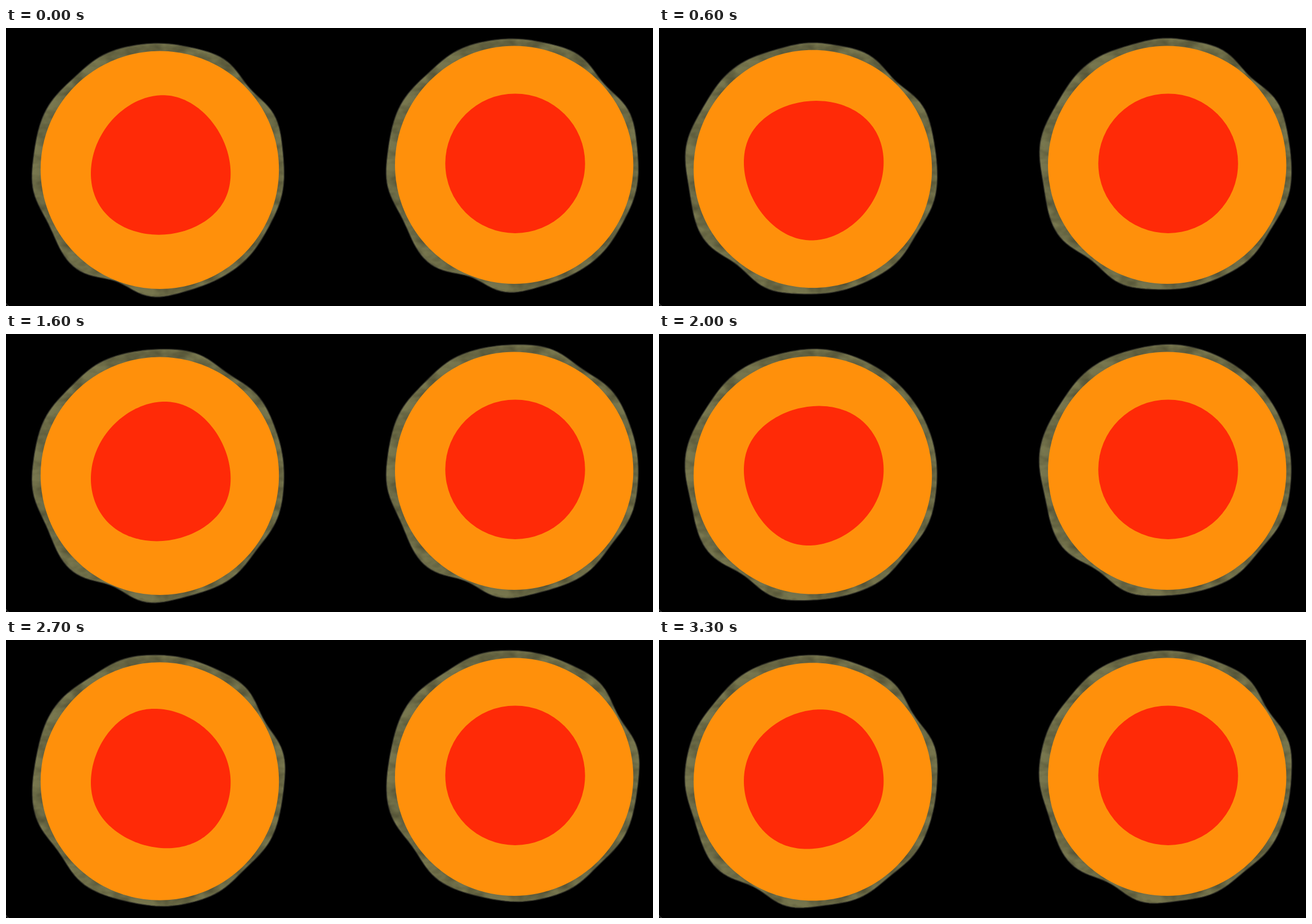
Write an HTML page that moves like this. It is 1136 by 489 pixels and loops after 3400 ms.

```html
<!DOCTYPE html>
<html lang="en">
<head>
<meta charset="utf-8">
<title>Turning bodies</title>
<style>
  html, body { margin: 0; width: 100%; height: 100%; overflow: hidden; background: #000; }
  svg { display: block; width: 100vw; height: 100vh; }
</style>
</head>
<body>
<svg viewBox="0 0 1136 489">
  <defs>
    <radialGradient id="bark" gradientUnits="userSpaceOnUse" cx="0" cy="0" r="231">
      <stop offset=".9" stop-color="#72714b"/>
      <stop offset=".96" stop-color="#79784f"/>
      <stop offset="1" stop-color="#67664a"/>
    </radialGradient>
    <filter id="grain" filterUnits="userSpaceOnUse" x="-240" y="-240" width="480" height="480" color-interpolation-filters="sRGB">
      <feTurbulence type="fractalNoise" baseFrequency=".03 .05" numOctaves="3" seed="4"/>
      <feColorMatrix values="0 0 0 0 0  0 0 0 0 0  0 0 0 0 0  .6 0 0 0 -.2"/>
      <feComposite in2="SourceAlpha" operator="in" result="dark"/>
      <feMerge><feMergeNode in="SourceGraphic"/><feMergeNode in="dark"/></feMerge>
    </filter>
    <g id="shell" filter="url(#grain)">
      <path id="rim" fill="url(#bark)" stroke="#34342a" stroke-width="1.5" stroke-linejoin="round"/>
    </g>
  </defs>
  <rect width="1136" height="489" fill="#000"/>
  <use href="#shell" x="270" y="249"/>
  <use href="#shell" x="892" y="241"/>
  <path id="orange" fill="#ff900b"/>
  <path id="red" fill="#ff2a07"/>
  <circle cx="892.2" cy="240.7" r="209.2" fill="#ff900b"/>
  <circle cx="894" cy="238.2" r="122.7" fill="#ff2a07"/>
  <path d="M0 484Q1 488 5 489" fill="none" stroke="#555" stroke-width="1"/>
</svg>
<script>
const LOOP = 3400, STEP = 100, RAD = Math.PI / 180;
const TURN = 45.6, THIRD = TURN / 3; // steps per full turn and per lobe
const { sin, cos, exp, min, max } = Math;
const el = id => document.getElementById(id);
const pt = (x, y) => x.toFixed(2) + ' ' + y.toFixed(2);

// A hollow with a swelling on either side
function dent(angle, at) {
  const x = ((angle - at + 540) % 360) - 180;
  return -cos(x * Math.PI / 22) * exp(-((x / 26) ** 2));
}

// One hollow per turn creeps up the right side
function rightDents(angle, n) {
  const f = ((n - 20 + TURN) % TURN) / TURN;
  return 7 * min(1, f * 8, (1 - f) * 8) * dent(angle, 28 + 32 * f ** 1.4);
}

// Three hollows per turn climb the left side, fading as they go
function leftDents(angle, n) {
  let sum = 0;
  for (let age = n % THIRD - THIRD; age < 30; age += THIRD)
    sum += max(0, min(1, (age + 4) / 4)) * max(0, 1 - age / 30) * dent(angle, 249 - 2.9 * age);
  return 9 * sum;
}

// The far edge shows the same hollows mirrored, half a cycle later and weaker
function rimRadius(deg, n) {
  const a = deg * RAD, far = 360 - deg;
  const swell = 12 - 2.5 * cos(a) + 1.5 * sin(a) +
    rightDents(deg, n) + .5 * rightDents(far, n + TURN / 2) +
    leftDents(deg, n) + .4 * leftDents(far, n + THIRD / 2);
  return 209 + max(2, swell);
}

function trace(point) {
  let d = '';
  for (let deg = 0; deg < 360; deg += 2) d += (d ? 'L' : 'M') + point(deg);
  return d + 'Z';
}

// Convex outline from its support function h(angle)
function hull(cx, cy, h) {
  const e = 1e-3;
  return trace(deg => {
    const a = deg * RAD, r = h(a), s = (h(a + e) - h(a - e)) / (2 * e);
    return pt(cx + r * cos(a) - s * sin(a), cy - r * sin(a) - s * cos(a));
  });
}

function draw(n) {
  const turn = 17 * RAD + n / THIRD * 2 * Math.PI;
  el('rim').setAttribute('d', trace(deg => {
    const a = deg * RAD, r = rimRadius(deg, n);
    return pt(r * cos(a), -r * sin(a));
  }));
  el('orange').setAttribute('d', hull(270, 248.6, a =>
    209.2 - 1.2 * cos(turn - 30 * RAD) * sin(a) ** 3));
  el('red').setAttribute('d', hull(271.7, 245.9, a => {
    const s = sin(a), c = cos(a);
    return 122.7 + 5.2 * cos(turn) * s * (s * s - 2 * c * c) + 12 * sin(turn) * c * s ** 3;
  }));
}

let start = null, last = 0;
function tick(now) {
  if (start === null) start = now;
  const step = Math.floor(((now - start) % LOOP) / STEP);
  if (step !== last) draw(last = step);
  requestAnimationFrame(tick);
}
draw(0);
requestAnimationFrame(tick);
</script>
</body>
</html>
```
